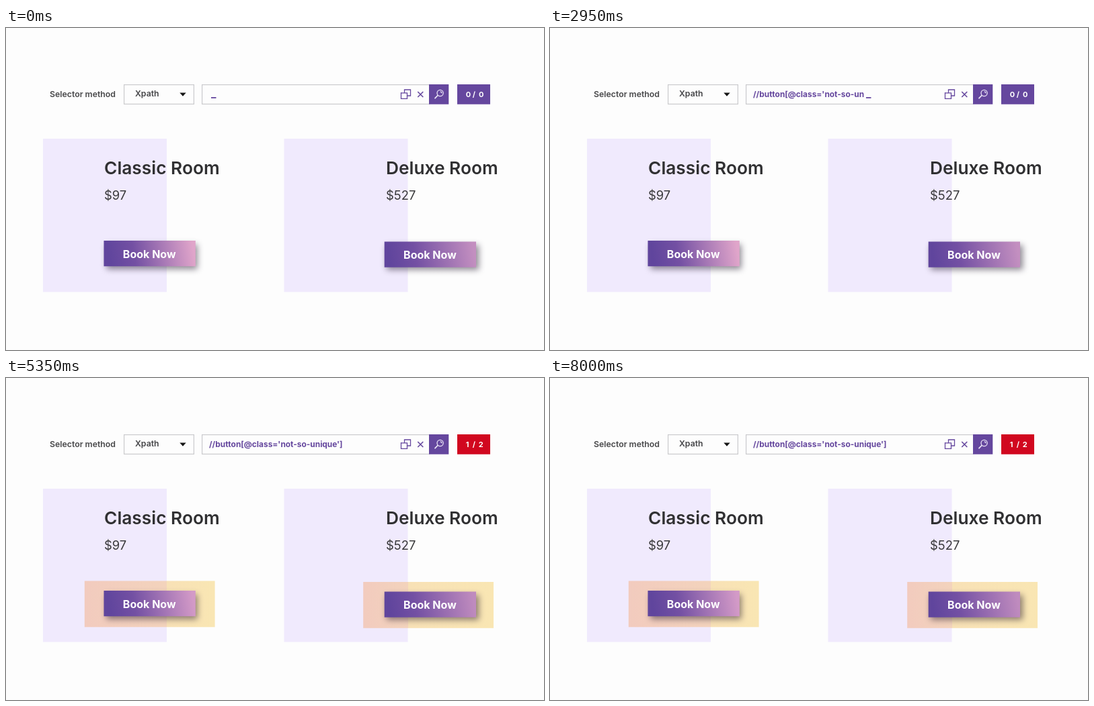
Animation of 800x480 px, one loop 8050 ms. Source, as an HTML page with a canvas:

```html
<!DOCTYPE html>
<html lang="en">
<head>
<meta charset="utf-8">
<title>Selector check</title>
<style>
html, body { margin: 0; width: 100%; height: 100%; overflow: hidden; background: #fdfdfd; }
canvas { display: block; }
</style>
</head>
<body>
<canvas id="stage" width="800" height="480"></canvas>
<script>
const ctx = document.getElementById('stage').getContext('2d');
const LOOP = 8050, TYPE_START = 1390, TYPE_STEP = 60, FOUND = 4850;
const QUERY = "//button[@class='not-so-unique']";
const PURPLE = '#65479e';

function text(str, x, y, size, weight, color, align = 'left') {
  ctx.font = `${weight} ${size}px Inter, "Open Sans", sans-serif`;
  ctx.fillStyle = color;
  ctx.textAlign = align;
  ctx.fillText(str, x, y);
}

function rect(x, y, w, h, fill) {
  ctx.fillStyle = fill;
  ctx.fillRect(x, y, w, h);
}

function gradient(x0, y0, x1, y1, stops) {
  const g = ctx.createLinearGradient(x0, y0, x1, y1);
  for (const [at, color] of stops) g.addColorStop(at, color);
  return g;
}

function lines(color, width, ...paths) {
  ctx.strokeStyle = color;
  ctx.lineWidth = width;
  ctx.beginPath();
  for (const path of paths) {
    path.forEach(([x, y], i) => i ? ctx.lineTo(x, y) : ctx.moveTo(x, y));
  }
  ctx.stroke();
}

function frame(x, y, w, h) {
  ctx.strokeStyle = '#cacacd';
  ctx.lineWidth = 1.2;
  ctx.strokeRect(x, y, w, h);
}

function drawQuery(t) {
  const count = Math.floor((t - TYPE_START) / TYPE_STEP);
  const typed = QUERY.slice(0, Math.max(0, count));
  text(typed, 302, 103, 11.9, 700, PURPLE);
  if (count < QUERY.length) {
    const x = typed ? 302 + ctx.measureText(typed + ' ').width : 305;
    rect(x, 103, 7.5, 1.8, PURPLE);
  }
}

function drawIcons() {
  lines(PURPLE, 1.3,
    [[592.5, 96.5], [592.5, 92], [601.5, 92], [601.5, 101], [596.8, 101]],
    [[587.5, 96.8], [596.5, 96.8], [596.5, 105.3], [587.5, 105.3], [587.5, 96.1]]);
  lines(PURPLE, 1.6, [[612.3, 95], [620.3, 103]], [[620.3, 95], [612.3, 103]]);

  rect(629, 84, 29.3, 29.7, PURPLE);
  ctx.lineCap = 'round';
  lines('#e9e2f5', 1.8, [[642, 100.5], [638, 104.7]]);
  ctx.lineCap = 'butt';
  ctx.lineWidth = 1.3;
  ctx.beginPath();
  ctx.arc(645.6, 97, 4.6, 0, Math.PI * 2);
  ctx.stroke();
  ctx.beginPath();
  ctx.arc(645.6, 97, 2.2, -1.5, 0.1);
  ctx.stroke();
}

function drawToolbar(t, found) {
  text('Selector method', 65, 103, 12.3, 600, '#48484a');
  frame(175.6, 84.6, 103.8, 28.8);
  text('Xpath', 192, 102, 12.3, 600, '#444447');
  ctx.fillStyle = '#161616';
  ctx.beginPath();
  ctx.moveTo(258.3, 96.5);
  ctx.lineTo(267.7, 96.5);
  ctx.lineTo(263, 101.8);
  ctx.fill();

  frame(291.6, 84.6, 338, 28.8);
  drawQuery(t);
  drawIcons();

  rect(671, 84, 49, 29.7, found ? '#d1071f' : PURPLE);
  const parts = found ? ['1', '/', '2'] : ['0', '/', '0'];
  const spots = found ? [686, 696, 706.3] : [687.5, 696, 706.7];
  parts.forEach((s, i) => text(s, spots[i], 103, 11, 700, '#fff', 'center'));
}

// edge is where the lilac panel ends beneath the highlight
function drawHighlight(x, y, edge) {
  const w = 193.8, k = (edge - x) / w;
  rect(x, y, w, 68.8, gradient(x, 0, x + w, 0, [
    [0, '#f2cbbe'], [k, '#f3d3bc'], [k, '#f8e1b6'], [1, '#f9e6b3']
  ]));
}

function drawButton(x, y, end) {
  ctx.save();
  ctx.shadowColor = 'rgba(30,20,40,.5)';
  ctx.shadowBlur = 9;
  ctx.shadowOffsetX = 3.5;
  ctx.shadowOffsetY = 4.5;
  rect(x, y, 136.3, 38.2, gradient(x + 8, y + 28, x + 132, y + 8, [
    [0, '#60459d'], [0.3, '#7350a3'], [1, end]
  ]));
  ctx.restore();
  text('Book Now', x + 67.7, y + 25.6, 16, 700, '#fff', 'center');
}

function drawRoom(room, found) {
  rect(room.panel, 165, 184, 228.5, '#f0eafd');
  if (found) drawHighlight(room.mark, room.y - 14.5, room.panel + 184);
  text(room.name, room.x, 217.6, 26.3, 600, '#303032');
  text(room.price, room.x, 255.6, 18.4, 400, '#3a3a3c');
  drawButton(room.button, room.y, found ? room.endFound : room.end);
}

const rooms = [
  { name: 'Classic Room', price: '$97', panel: 55, x: 146, button: 145.5, y: 317,
    mark: 116.8, end: '#e0a5ca', endFound: '#d39ac7' },
  { name: 'Deluxe Room', price: '$527', panel: 413.5, x: 565, button: 562.7, y: 318.5,
    mark: 531.2, end: '#c38fc0', endFound: '#bf8bbe' }
];

function draw(now) {
  const t = now % LOOP;
  const found = t >= FOUND;
  rect(0, 0, 800, 480, '#fdfdfd');
  drawToolbar(t, found);
  for (const room of rooms) drawRoom(room, found);
}

const start = performance.now();
function tick() {
  draw(performance.now() - start);
  requestAnimationFrame(tick);
}
tick();
</script>
</body>
</html>
```
